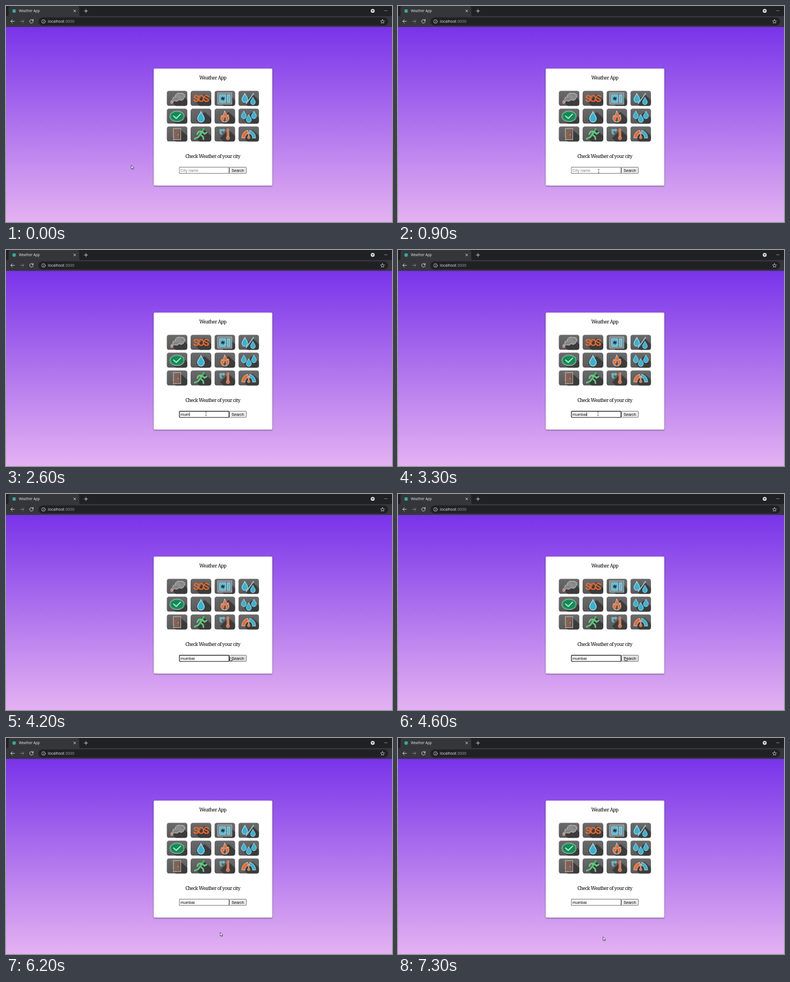
Recreate the animation shown at these times as an HTML page. Size 690x388 px, loop 8000 ms.

```html
<!DOCTYPE html>
<html lang="en">
<head>
<meta charset="utf-8">
<title>Weather App</title>
<style>
  html, body { margin: 0; width: 100%; height: 100%; overflow: hidden; }
  svg { display: block; width: 100%; height: 100%; }
  .chrome { font-family: "Open Sans", sans-serif; fill: #e8eaed; }
  .heading { font: 500 8.6px "Noto Serif", serif; letter-spacing: -.5px; text-anchor: middle; }
  .control { font: 7.1px "Liberation Sans", sans-serif; }
  .line { fill: none; stroke-linecap: round; stroke-linejoin: round; }
  .sos { font: 17px Roboto, sans-serif; letter-spacing: -1.8px; paint-order: stroke; }
  .degree { font: bold 13px "Liberation Sans", sans-serif; paint-order: stroke; }
</style>
</head>
<body>
<svg viewBox="0 0 690 388">
  <defs>
    <linearGradient id="sky" x2="0" y2="1">
      <stop stop-color="#7933e9"/><stop offset="1" stop-color="#e4b2f2"/>
    </linearGradient>
    <linearGradient id="tile" x2="0" y2="1">
      <stop stop-color="#6a6a6a"/><stop offset="1" stop-color="#585858"/>
    </linearGradient>
    <filter id="shadow" x="-10%" y="-10%" width="120%" height="120%">
      <feDropShadow dx="0" dy="1.2" stdDeviation="1.3" flood-opacity=".5"/>
    </filter>
    <path id="drop" d="M0-9C2-4 6-1 6 4A6 6 0 0 1-6 4C-6-1-2-4 0-9Z"/>
    <clipPath id="round"><rect width="37" height="27.300" rx="4.500"/></clipPath>
  </defs>

  <rect y="37" width="690" height="351" fill="url(#sky)"/>

  <!-- Browser bar -->
  <rect width="690" height="18" fill="#202124"/>
  <path d="M0 18H2Q4.500 18 4.500 15V4Q4.500 0 8.500 0H127Q131 0 131 4V15Q131 18 134 18H690V37.500H0Z" fill="#35363a"/>
  <rect x="58" y="20.500" width="625" height="14.500" rx="7.250" fill="#202124"/>
  <circle cx="14.500" cy="9" r="3.200" fill="#38a7a0"/>
  <g class="chrome">
    <text x="23" y="11.200" font-size="6.200">Weather App</text>
    <text x="75" y="30.200" font-size="7">localhost<tspan fill="#9aa0a6">:3000</tspan></text>
  </g>
  <g class="line" stroke="#dcdee1" stroke-width=".9">
    <path d="M121 7l3.600 3.600m0-3.600l-3.600 3.600M140 9h6m-3-3v6"/>
    <path d="M676.500 8.500h5" stroke="#a6a8ab" stroke-width=".7"/>
    <path d="M15 27.500H8.500m3-3l-3 3 3 3"/>
    <path d="M25.500 27.500H32m-3-3l3 3-3 3" stroke="#85878b"/>
    <path d="M48 25.500A3.200 3.200 0 1 0 48.700 28M48.700 24v2.300H46.300"/>
    <circle cx="67" cy="27.800" r="3.300" stroke-width=".7"/>
    <path d="M67 27.500v2M67 26v.1" stroke-width=".7"/>
    <path d="M673 24.300l1 2.300 2.500.2-1.900 1.700.6 2.500-2.200-1.300-2.200 1.300.6-2.500-1.900-1.700 2.500-.2z" stroke-width=".7"/>
  </g>
  <circle cx="655.500" cy="8.800" r="3.500" fill="#dcdee1"/>
  <path d="M653.700 7.800h3.600l-1.800 2.300z" fill="#202124"/>

  <!-- Card -->
  <rect x="264" y="112.500" width="212" height="210" rx="2" fill="#fff" filter="url(#shadow)"/>
  <text class="heading" x="369.600" y="132">Weather App</text>
  <text class="heading" x="369.600" y="273.200">Check Weather of your city</text>
  <g id="tiles"></g>

  <rect id="field" x="310" y="289.600" width="88.600" height="11.100" fill="#fff"/>
  <text id="value" class="control" x="312" y="297.800"></text>
  <path id="caret" d="M0 291.500v7" stroke="#000" stroke-width=".7"/>
  <rect id="button" x="399.400" y="289.600" width="30.300" height="11.100" rx="1" stroke="#555" stroke-width=".8"/>
  <text class="control" x="403.300" y="297.800">Search</text>

  <path id="arrow" d="M0 0V6.700L1.600 5.300 2.700 7.600 3.800 7.100 2.800 4.900H4.800Z" fill="#fff" stroke="#222" stroke-width=".7"/>
  <path id="beam" class="line" d="M-1.200-3.300H1.200M0-3.300V3.300M-1.200 3.300H1.200" stroke="#444" stroke-width=".6"/>
</svg>
<script>
const $ = id => document.getElementById(id);
const LOOP = 8000;
const ORANGE = "#ee6a2e", CYAN = "#35b3d4", GREEN = "#22d656", EDGE = "#cfd4d6";

const drop = (x, y, scale) =>
  `<use href="#drop" transform="translate(${x} ${y}) scale(${scale})" fill="${CYAN}" stroke="#b4dde6" stroke-width="1.200"/>`;
const line = (d, color, width) =>
  `<path class="line" d="${d}" stroke="${color}" stroke-width="${width}"/>`;
const outlined = (d, color, width) => line(d, EDGE, width + 1) + line(d, color, width);
const arc = (d, color) =>
  `<path d="${d}" fill="${color}" stroke="${EDGE}" stroke-width=".8"/>`;

const icons = [
  // smoke
  `<path d="M8 21C6 16 11 18 11 15C10 11 14 11 15 11C15 5 21 3 25 5C31 3 35 9 31 13C30 18 24 18 22 16C20 20 15 19 14 18C11 18 12 20 11 22Z" fill="#8d8d8d" stroke="#c9c9c9" stroke-width=".9"/>`
    + line("M14 15Q19 17 20 13M24 8q4-1 4 3", "#6a6a6a", .9)
    + `<circle cx="9" cy="21.500" r="1.800" fill="#ef6135" stroke="#eee" stroke-width=".5"/>`,
  `<text class="sos" x="4.700" y="20" fill="${ORANGE}" stroke="${ORANGE}" stroke-width=".7">SOS</text>`,
  // broken window
  `<path d="M6 4H31V24H6Z" fill="#6d7c83" stroke="#c3cccf"/>
   <path d="M9 7H20V21H9ZM23 7H28V21H23Z" fill="#58bcd8" stroke="#d2e6ec" stroke-width=".7"/>
   <path d="M15 10l.7 2.500 3-1.500-1.500 3 2.500 1-3 .5-1 3-1.500-3-3 1.500 1.500-3-2.500-1.500 3 0Z" fill="#27363d"/>`,
  drop(11.5, 12.5, .85) + drop(26, 18, .7) + outlined("M27 5L14 23", CYAN, 1),
  // check mark
  `<ellipse cx="18.500" cy="14" rx="12.700" ry="9.500" fill="#118957" stroke="#9db5a8" stroke-width="1.200"/>
   <ellipse cx="18.500" cy="14" rx="11" ry="7.900" fill="none" stroke="#28a86c" stroke-width=".9"/>`
    + line("M12.500 13.500L17 17.700 24.500 10.300", "#a5e2bf", 2.2),
  drop(18.5, 14.5, 1),
  // flame
  `<path d="M18 4C20 10 23 10 23 14L24.500 11C28 20 24 24.500 18 24.500C11 24.500 10 17 13 12L15 15C15 10 18 9 18 4Z" fill="${ORANGE}" stroke="${EDGE}" stroke-width=".9"/>
   <path d="M18 13C22 17 22 20 20 24H16C14 20 18 18 18 13Z" fill="#5d5550" stroke="#ddd" stroke-width=".7"/>`,
  drop(9.7, 11, .72) + drop(27.8, 11, .72) + drop(18.7, 17.5, .75),
  // door
  `<path d="M12 4H25V24H12Z" fill="#54494a" stroke="#bdb5b0" stroke-width="1.200"/>
   <path d="M13.500 5.500L22 4.500V24L13.500 22.500Z" fill="#83604f" stroke="#a78877" stroke-width=".6"/>
   <circle cx="20" cy="15" r=".7" fill="#ddd"/>`,
  // runner
  outlined("M21 9L17 15 22 18 23 23M17 15L13 20 7.500 22M21 9L14.500 9.500 12 13.500M21 10L25 13.500 28.500 11", GREEN, 1.5)
    + `<circle cx="23" cy="5.500" r="2" fill="${GREEN}"/>`,
  // temperature
  `<text class="degree" x="9" y="14" fill="${CYAN}" stroke="#d5e3e7" stroke-width=".8">t°</text>`
    + outlined("M24 6V20", ORANGE, 3)
    + `<circle cx="24" cy="21" r="3" fill="${ORANGE}" stroke="${EDGE}" stroke-width=".6"/>`,
  // gauge
  arc("M6 21A12.500 14 0 0 1 17 7V13A6.500 7 0 0 0 12 21Z", ORANGE)
    + arc("M20 7A12.500 14 0 0 1 31 21H25A6.500 7 0 0 0 20 13Z", CYAN)
    + outlined("M18.500 19V11", ORANGE, 1.2)
    + `<circle cx="18.500" cy="20" r="2.300" fill="${ORANGE}" stroke="${EDGE}" stroke-width=".6"/>`
];

$("tiles").innerHTML = icons.map((icon, i) => `
  <g transform="translate(${287.3 + i % 4 * 42.7} ${152.2 + Math.floor(i / 4) * 32})" clip-path="url(#round)">
    <rect width="37" height="27.300" fill="url(#tile)"/>
    <path d="M10 21L25 6 37 17V28H17Z" fill="#303030" opacity=".75"/>
    ${icon}
  </g>`).join("");

// [time, x, y] of the pointer's hot spot
const path = [
  [0, 223.8, 286], [100, 230, 291], [200, 238.5, 299], [300, 238.5, 299],
  [400, 247, 313], [500, 273, 335], [600, 311, 340], [700, 344, 322],
  [800, 358, 301], [900, 358.7, 296.7], [1100, 357.5, 294.3], [3800, 357.5, 294.3],
  [4000, 380, 295], [4200, 400.3, 293.3], [4700, 407, 293.5], [5700, 407, 293.5],
  [5900, 403, 312], [6200, 383, 349], [7000, 383, 349], [7300, 366.5, 357], [LOOP, 366.5, 357]
];
const keys = [1900, 2300, 2600, 2700, 3100, 3300];
const FOCUS = 1400, CLICK = 5200;

function pointerAt(t) {
  const i = path.findIndex(p => p[0] > t);
  const [t0, x0, y0] = path[i - 1], [t1, x1, y1] = path[i];
  const k = (t - t0) / (t1 - t0);
  return [x0 + (x1 - x0) * k, y0 + (y1 - y0) * k];
}

function set(id, attributes) {
  for (const name in attributes) $(id).setAttribute(name, attributes[name]);
}

function draw(now) {
  const t = now % LOOP;
  const [x, y] = pointerAt(Math.floor(t / 100) * 100);
  const inRow = y > 289 && y < 301.5;
  const overField = inRow && x > 310 && x < 399;
  const overButton = inRow && x >= 399 && x < 430;
  const focused = t >= FOCUS && t < CLICK;
  const typed = "mumbai".slice(0, keys.filter(k => t >= k).length);

  $("value").textContent = typed || "City name";
  set("value", { fill: typed ? "#000" : "#858585" });
  set("field", { stroke: focused ? "#111" : "#555", "stroke-width": focused ? 1.15 : .8, rx: focused ? 1 : 0 });
  set("button", { fill: overButton ? "#e3e3e3" : "#efefef", stroke: t >= CLICK && overButton ? "#222" : "#555" });

  const caretX = 312.4 + (typed ? $("value").getComputedTextLength() : 0);
  set("caret", { transform: `translate(${caretX} 0)`, visibility: focused && t < 3900 ? "visible" : "hidden" });

  const transform = `translate(${x} ${y})`;
  set("arrow", { transform, visibility: overField ? "hidden" : "visible" });
  set("beam", { transform, visibility: overField ? "visible" : "hidden" });
  requestAnimationFrame(draw);
}
draw(0);
</script>
</body>
</html>
```
